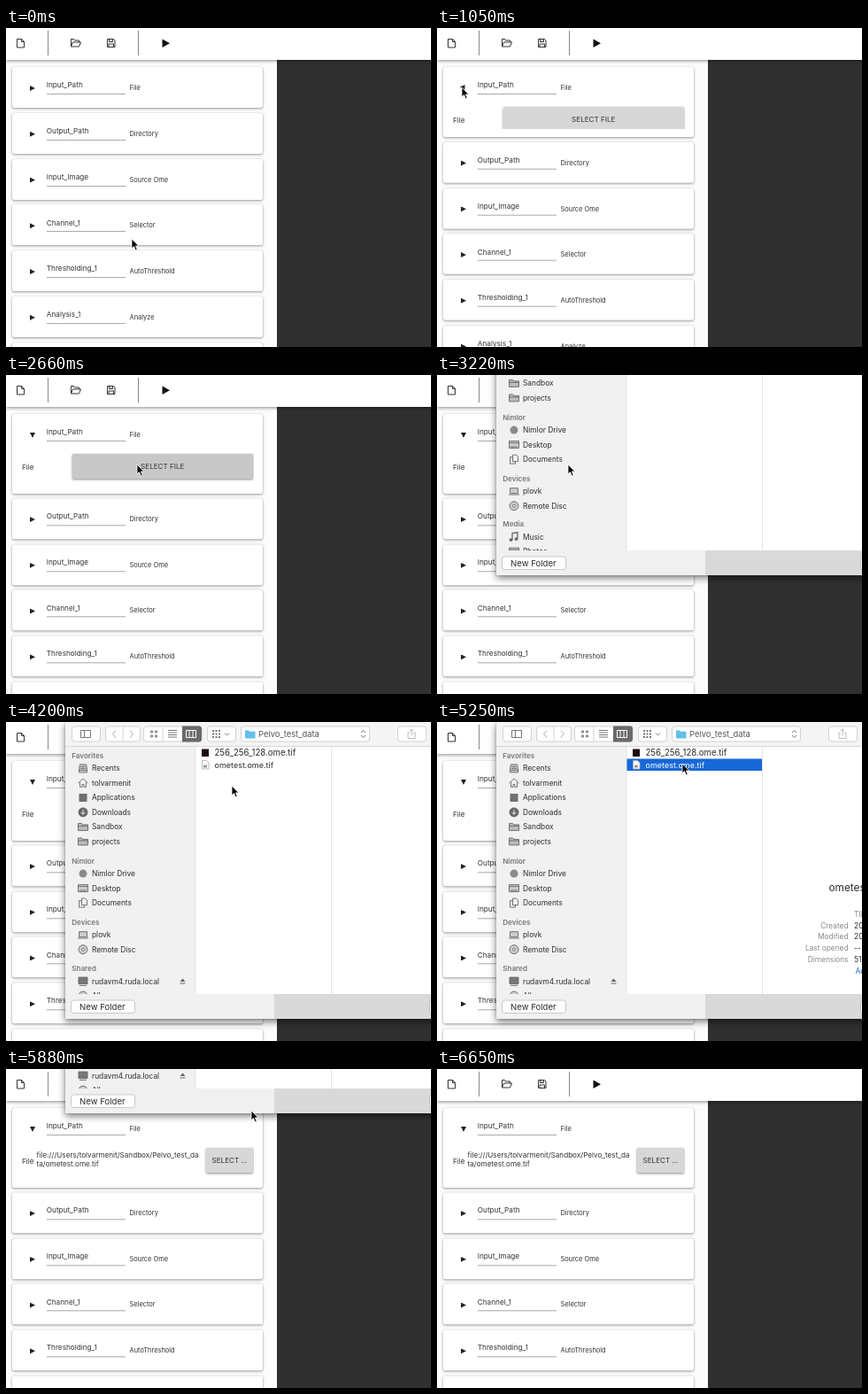
An HTML page for the animation above (7.07 s loop, 480x360 px).

```html
<!DOCTYPE html>
<html lang="en">
<head>
<meta charset="utf-8">
<title>Pipeline editor</title>
<style>
html, body { margin: 0; width: 100%; height: 100%; overflow: hidden; }
body { font-family: Inter, "Liberation Sans", sans-serif; color: #333; }
#stage { position: relative; width: 480px; height: 360px; overflow: hidden; background: #fcfcfc; }
#stage div, #stage svg { position: absolute; }
svg { display: block; overflow: visible; }
.t { white-space: pre; line-height: 12px; }

/* One loop is 101 ticks of 70 ms; changes land on ticks. */
.a { animation: 7070ms step-end infinite; }

#panel { left: 306px; top: 36px; width: 174px; height: 324px; background: #303030; }
#bar { left: 0; top: 0; width: 480px; height: 35.5px; background: #fff; box-shadow: 0 1px 4px #0007; }

.card { left: 7px; width: 283px; height: 46px; background: #fff; border-radius: 2.5px;
  box-shadow: 0 1px 3px #0006, 0 0 1px #0003; }
.name { left: 38.8px; top: 14.4px; font-size: 8.2px; }
.line { left: 39px; top: 30px; width: 89px; height: 1px; background: #aaa; }
.kind { left: 132.5px; top: 18px; font-size: 7.45px; }
.tri { left: 20px; top: 21px; width: 6px; height: 6px; background: #222;
  clip-path: polygon(0 0, 100% 50%, 0 100%); }

#first { animation-name: grow; }
#first .tri { animation-name: turn; }
#rest { left: 0; top: 0; animation-name: push; }
#body { left: 8px; right: 10px; top: 38px; bottom: 9px; overflow: hidden; }
.btn { top: 7px; height: 28px; border-radius: 1.5px; background: #d7d7d7; font-size: 8.1px;
  line-height: 28px; text-align: center; white-space: nowrap; box-shadow: 0 1px 3px #0007; }
#wide { left: 59.5px; width: 204.5px; animation-name: press; }
#done { left: 0; top: 0; width: 265px; height: 44px; animation-name: done; }
#done .btn { left: 211px; width: 53px; }
#path { left: 19.5px; top: 11px; font-size: 8.15px; line-height: 9.7px; white-space: pre; }

#sheet { left: 67px; top: 0; width: 440px; height: 335px; background: #fff; overflow: hidden;
  box-shadow: 0 3px 8px #0008, 0 0 1px #0006; animation-name: slide; }
#early { animation-name: early; }
.late { animation-name: late; }
.pick { animation-name: pick; }
#open { animation-name: recolor; }
#cursor { left: -.5px; top: -.5px; animation-name: move; }

@keyframes grow {
  0% { height: 46px } 13.861% { height: 61px } 14.851% { height: 79px }
  15.841% { height: 86.5px } 16.831%, 100% { height: 89.5px }
}
@keyframes push {
  0% { transform: none } 13.861% { transform: translateY(15px) } 14.851% { transform: translateY(32.7px) }
  15.841% { transform: translateY(40.2px) } 16.831%, 100% { transform: translateY(43.3px) }
}
@keyframes turn {
  0% { transform: none } 13.861% { transform: rotate(35deg) } 14.851% { transform: rotate(68deg) }
  15.841% { transform: rotate(84deg) } 16.831%, 100% { transform: rotate(90deg) }
}
@keyframes press {
  0% { background: #d7d7d7 }
  19.801% { background: #c8c8c8 }
  23.762% { background: #c8c8c8; box-shadow: 0 2px 6px #0007 }
  37.623% { background: #c8c8c8; box-shadow: 0 1px 3px #0007 }
  83.168%, 100% { visibility: hidden }
}
@keyframes done { 0% { visibility: hidden } 83.168%, 100% { visibility: visible } }
@keyframes slide {
  0% { transform: translateY(-360px) }
  43.564% { transform: translateY(-290px) }
  44.554% { transform: translateY(-200px) }
  45.544% { transform: translateY(-109px) }
  46.534% { transform: translateY(-42px) }
  47.524% { transform: none }
  79.207% { transform: translateY(-15px) }
  80.198% { transform: translateY(-57.5px) }
  81.188% { transform: translateY(-120px) }
  82.178% { transform: translateY(-200px) }
  83.168% { transform: translateY(-285px) }
  84.158%, 100% { transform: translateY(-360px) }
}
@keyframes early { 0% { visibility: visible } 50.495%, 100% { visibility: hidden } }
@keyframes late { 0% { visibility: hidden } 50.495%, 100% { visibility: visible } }
@keyframes pick { 0% { visibility: hidden } 73.267%, 100% { visibility: visible } }
@keyframes recolor { 0% { fill: #2c2c2c } 73.267%, 100% { fill: #fff } }
@keyframes move {
  0% { transform: translate(142px, 238px); animation-timing-function: steps(7) }
  6.93% { transform: translate(30px, 70px) }
  7.92% { transform: translate(30px, 70px); animation-timing-function: steps(3) }
  10.891% { transform: translate(28px, 67px) }
  14.851% { transform: translate(28px, 67px); animation-timing-function: steps(6) }
  20.792% { transform: translate(148px, 101px) }
  49.504% { transform: translate(148px, 101px); animation-timing-function: steps(10) }
  59.405% { transform: translate(255px, 72px) }
  60.396% { transform: translate(258px, 61px); animation-timing-function: steps(11) }
  71.287% { transform: translate(277px, 47px) }
  85.148% { transform: translate(277px, 47px); animation-timing-function: steps(9) }
  94.059%, 100% { transform: translate(215px, 364px) }
}
</style>
</head>
<body>
<div id="stage">
  <div id="panel"></div>
  <div id="rest" class="a"></div>
  <div id="first" class="card a" style="top:44px">
    <div id="body">
      <div class="t" style="left:3px;top:15.5px;font-size:8.1px">File</div>
      <div id="wide" class="btn a">SELECT FILE</div>
      <div id="done" class="a">
        <div id="path">file:///Users/tolvarmenit/Sandbox/Pelvo_test_da
ta/ometest.ome.tif</div>
        <div class="btn">SELECT ...</div>
      </div>
    </div>
  </div>

  <div id="bar">
    <svg width="480" height="36" fill="none" stroke="#333">
      <path d="M47.5 3v28M149.5 3v28" stroke="#888"/>
      <path d="M12.5 12.5h5l3 3v6.5h-8zM17.5 12.5v3h3"/>
      <path d="M73.5 21v-8.5h3l1 1.5h5v2M73.5 21l2-5h9l-2 5z"/>
      <path d="M114.5 12.5h7l1.5 1.5v7.5h-8.5zM116.5 12.5v3h4v-3M116 21.5v-3.5h5.5v3.5"/>
      <path d="M176.5 12.5l8.5 4.7l-8.5 4.7z" fill="#111" stroke="none"/>
    </svg>
  </div>

  <div id="sheet" class="a">
    <svg id="finder" width="440" height="335" viewBox="67 0 440 335">
      <path d="M67 27h147v280h-147z" fill="#f1f1f1"/>
      <path d="M214 27v280M367.5 27v280" stroke="#e4e4e4"/>
      <g id="side"></g>
      <path d="M67 0h440v27h-440z" fill="#f4f4f4"/>
      <path d="M67 27.5h440" stroke="#d8d8d8"/>
      <g fill="#fff" stroke="#d2d2d2">
        <rect x="74.5" y="5" width="32" height="17" rx="3"/>
        <rect x="112.5" y="5" width="39" height="17" rx="3"/>
        <rect x="155.5" y="5" width="65.5" height="17" rx="3"/>
        <rect x="227.5" y="5" width="32" height="17" rx="3"/>
        <rect x="265.5" y="5" width="145" height="17" rx="3"/>
        <rect x="442.5" y="5" width="32" height="17" rx="3"/>
        <path d="M132 5v17M177 5v17"/>
      </g>
      <path d="M199 4.5h19q3 0 3 3v12q0 3-3 3h-19z" fill="#6a6a6a"/>
      <g fill="none" stroke="#777">
        <path d="M84.5 9.5h11v8h-11zM88.5 9.5v8"/>
        <path d="M124 9.5l-3.5 4l3.5 4M140 9.5l3.5 4l-3.5 4" stroke="#aaa"/>
        <path d="M163.5 10h2v2h-2zM168.5 10h2v2h-2zM163.5 15h2v2h-2zM168.5 15h2v2h-2z"/>
        <path d="M183 9.5h10M183 12h10M183 14.5h10M183 17h10"/>
        <path d="M203.5 9.5h11v8h-11zM207 9.5v8M211 9.5v8" stroke="#fff"/>
        <path d="M233 10h9M233 13.5h9M233 17h9" stroke-width="2" stroke-dasharray="2 1.5"/>
        <path d="M247 12.5l2.5 2.5l2.5-2.5M401 12l2.5-2.5l2.5 2.5M401 15l2.5 2.5l2.5-2.5"/>
        <path d="M456 12h-2v6.5h8v-6.5h-2M458 15.5v-7.5M456 10l2-2l2 2" stroke="#bbb"/>
      </g>
      <path d="M67 307h236v28h-236z" fill="#f0f0f0"/>
      <path d="M303 307h204v28h-204z" fill="#d9d9d9"/>
      <rect x="73.5" y="314" width="72" height="14.5" rx="3" fill="#fff" stroke="#c8c8c8"/>
      <rect x="478.5" y="314" width="50" height="14.5" rx="3" fill="#fff" stroke="#bbb"/>
      <g id="labels"></g>
    </svg>
  </div>

  <svg id="cursor" class="a" width="10" height="15">
    <path d="M0 0V10.8L2.5 8.5L4.3 12.7L6.2 11.9L4.4 7.9H7.8Z" fill="#000" stroke="#fff" stroke-width=".8"/>
  </svg>
</div>
<script>
const $ = id => document.getElementById(id);

// Pipeline cards; only the first one's arrow turns
const steps = [["Input_Path", "File"], ["Output_Path", "Directory"], ["Input_Image", "Source Ome"],
  ["Channel_1", "Selector"], ["Thresholding_1", "AutoThreshold"], ["Analysis_1", "Analyze"], ["", ""]];
const head = ([name, kind], turns = "") => `<div class="tri ${turns}"></div><div class="t name">${name}</div>
  <div class="line"></div><div class="t kind">${kind}</div>`;
$("first").insertAdjacentHTML("afterbegin", head(steps[0], "a"));
$("rest").innerHTML = steps.slice(1).map((s, i) =>
  `<div class="card" style="top:${44 + 51.75 * (i + 1)}px">${head(s)}</div>`).join("");

// Text whose capitals are centred on y
const text = (x, y, size, str, attrs = "") =>
  `<text x="${x}" y="${y + size * .364}" font-size="${size}" fill="#2c2c2c" ${attrs}>${str}</text>`;

const icons = {
  recent: '<path d="M-3.5-4.5h7l1 5v4h-9v-4zM-2.5-2h5M-3 0h6M-4.5 2h9" fill="#ccc"/>',
  home: '<path d="M-5.5 0L0-5L5.5 0M-3.5-1v5.5h2.5v-3h2v3h2.5v-5.5"/>',
  square: '<rect x="-4" y="-4" width="8" height="8" fill="#707070"/>',
  circle: '<circle r="4.5" fill="#8a8a8a" stroke="none"/>',
  down: '<circle r="5" fill="#666"/><path d="M0-3v5M-2.3 0l2.3 2.5l2.3-2.5" stroke="#fff"/>',
  folder: '<path d="M-5.5 4v-8h4l1 1.5h6v6.5zM-5.5-1h11" fill="#bbb"/>',
  desk: '<path d="M-5.5-4h11v8h-11zM-5.5-2h11M-4 2.5h8" fill="#ccc"/>',
  docs: '<path d="M-1.5-5h4l2 2v5.500h-6zM-1.5-2.5h-3v7.5h6v-2.5"/>',
  laptop: '<path d="M-4.5-3.5h9v6h-9z" fill="#ccc"/><path d="M-6 3.8h12"/>',
  disc: '<circle r="5" fill="#ccc"/><circle r="1.5" fill="#fff"/>',
  screen: '<path d="M-5-4.5h10v7.500h-10z" fill="#777"/><path d="M-4 4.8h8"/>',
  note: '<path d="M-2 3.5v-7.5l6-1v7" stroke-width="1.3"/><circle cx="-3.5" cy="3.5" r="1.5" fill="#666"/><circle cx="2.5" cy="2.5" r="1.5" fill="#666"/>',
};
const item = (y, icon, name) =>
  `<g transform="translate(87 ${y})" fill="none" stroke="#666" stroke-width=".9">${icons[icon]}</g>` +
  text(97, y, 8.35, name);
const group = (y, title, ...rows) =>
  text(74.2, y, 8.1, title, 'style="fill:#777;font-weight:600"') +
  rows.map(([icon, name], i) => item(y + 14.4 + 16.5 * i, icon, name)).join("");

$("side").innerHTML =
  group(38, "Favorites", ["recent", "Recents"], ["home", "tolvarmenit"], ["square", "Applications"],
    ["down", "Downloads"], ["folder", "Sandbox"], ["folder", "projects"]) +
  group(156.7, "Nimlor", ["circle", "Nimlor Drive"], ["desk", "Desktop"], ["docs", "Documents"]) +
  group(225.8, "Devices", ["laptop", "plovk"], ["disc", "Remote Disc"]) +
  `<g id="early" class="a">${group(277.2, "Media", ["note", "Music"], ["desk", "Photos"])}</g>` +
  `<g class="a late">${group(278.2, "Shared", ["screen", "rudavm4.ruda.local"], ["disc", "All..."])}
    <path d="M196.5 293l3-3.5l3 3.5zM196.5 294.500h6v1h-6z" fill="#666"/></g>`;

const facts = [["", "TIFF image"], ["Created", "2018"], ["Modified", "2018"],
  ["Last opened", "--"], ["Dimensions", "512"]];
const grey = 'style="fill:#888"';

$("labels").innerHTML = text(83, 321.4, 9.6, "New Folder") +
  `<g class="a late">
    <path d="M270 9.5h4l1 1.3h6.5v7.7h-11.5z" fill="#62c0ea"/>
    ${text(285, 13.7, 9.4, "Pelvo_test_data", 'style="fill:#555"')}
    <rect class="a pick" x="214.5" y="41.5" width="152.5" height="13.5" fill="#1768d8"/>
    <rect x="221" y="30.5" width="8" height="8.5" fill="#1b0b10"/>
    <path d="M221.5 43.5h5l2.5 2.5v7h-7.5z" fill="#fff" stroke="#aaa" stroke-width=".8"/>
    <path d="M223 48.5h4v3h-4z" fill="#999"/>
    ${text(235.5, 34.8, 9.65, "256_256_128.ome.tif")}
    ${text(235.5, 48.3, 9, "ometest.ome.tif", 'id="open" class="a"')}
  </g>
  <g class="a pick">
    ${text(442.5, 186.5, 11.8, "ometest.ome.tif")}
    ${facts.map(([key, value], i) => {
      const y = 217 + 12.7 * i;
      return text(464.5, y, 8.3, key, grey + ' text-anchor="end"') + text(471, y, 8.5, value, i ? "" : grey);
    }).join("")}
    ${text(472.5, 280.5, 8.5, "Add Tags...", 'style="fill:#2a72c8"')}
  </g>`;
</script>
</body>
</html>
```
